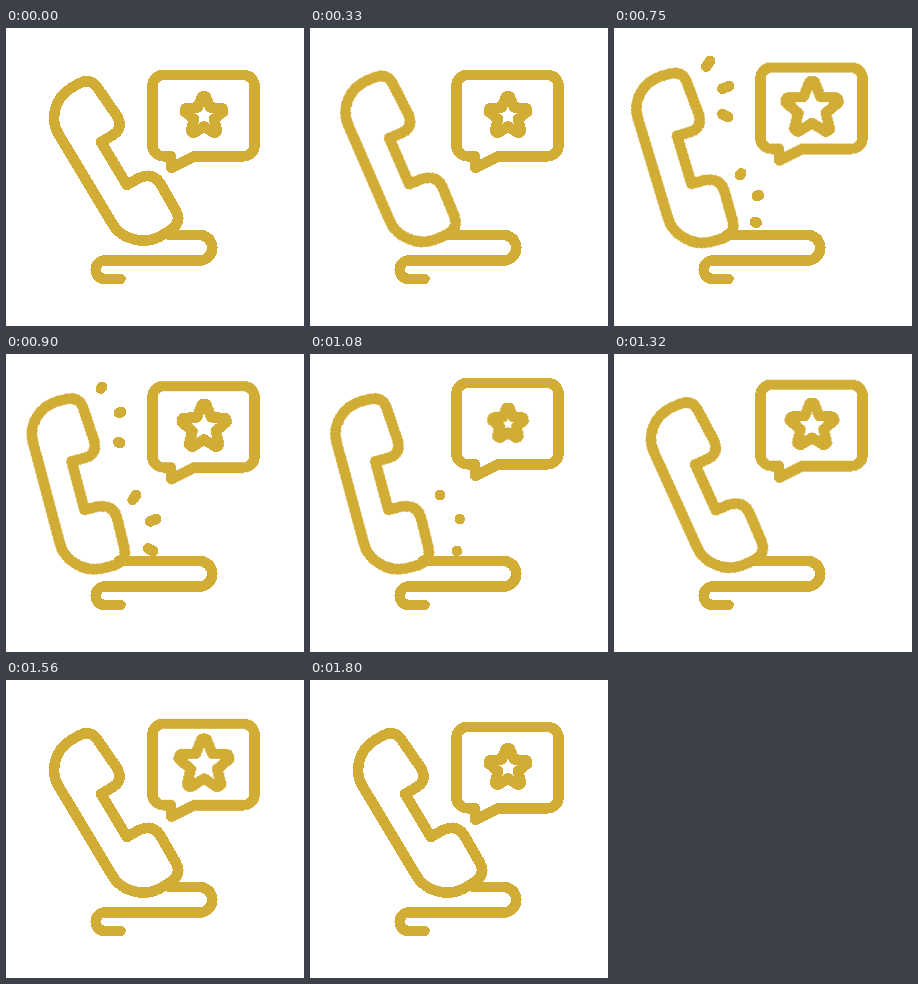
Recreate the animation shown at these times as an HTML page. Size 298 px wide and 298 px high, loop 2.25 s.

```html
<!DOCTYPE html>
<html lang="en">
<head>
<meta charset="utf-8">
<title>Ringing phone</title>
<style>
  html, body { margin: 0; height: 100%; overflow: hidden; background: #fff; }
  svg {
    display: block; width: 100%; height: 100%;
    fill: none; stroke: #d1ad35; stroke-width: 10.6;
    stroke-linecap: round; stroke-linejoin: round;
    shape-rendering: crispEdges;
  }
  .roll, .cord, .shake, .bubble, .star, .marks path {
    animation: 2250ms cubic-bezier(.37, 0, .63, 1) infinite;
  }
  .roll, .shake { transform-origin: 129px 185px; }
  .roll { animation-name: roll; }
  .shake { animation-name: shake; }
  .cord { stroke-dasharray: 400; animation-name: cord; }
  .bubble { animation-name: lift; }
  .star { animation-name: pulse; }
  #arm { vector-effect: non-scaling-stroke; }
  .marks path { stroke-width: 0; animation-name: ring; animation-timing-function: linear; }
  .marks .late { animation-delay: 120ms; }

  /* The handset rolls left along the cord and back. */
  @keyframes roll {
    0%, 6.67%, 64.89%, 100% { transform: translateX(0) rotate(0deg); }
    22.67%, 51.56% { transform: translateX(-50.5px) rotate(15deg); }
  }
  @keyframes cord {
    0%, 6.67%, 64.89%, 100% { stroke-dashoffset: -51; }
    22.67%, 51.56% { stroke-dashoffset: 0; }
  }
  @keyframes shake {
    0%, 22.67%, 51.56%, 100% { transform: rotate(0deg); }
    25.07%, 34.7%, 44.3% { transform: rotate(-1.2deg); }
    29.87%, 39.5%, 49.15% { transform: rotate(1.2deg); }
  }
  @keyframes lift {
    0%, 22.67% { transform: translateY(0); }
    46.67%, 54.67% { transform: translateY(-18px); }
    75.1%, 100% { transform: translateY(0); }
  }
  @keyframes pulse {
    0%, 21.33%, 80%, 100% { transform: scale(1); }
    34.2% { transform: scale(1.38); }
    48% { transform: scale(.82); }
    66.67% { transform: scale(1.35); }
  }
  /* Each dash grows outward, then draws in to a dot at its far end. */
  @keyframes ring {
    0%, 24.9% { stroke-width: 0; stroke-dasharray: .01 3; stroke-dashoffset: 0; }
    26.2% { stroke-width: 10.6; stroke-dasharray: .01 3; stroke-dashoffset: 0; }
    32.9% { stroke-width: 10.6; stroke-dasharray: 1 3; stroke-dashoffset: 0; }
    42.7% { stroke-width: 10.6; stroke-dasharray: .02 3; stroke-dashoffset: -.97; }
    44.9%, 100% { stroke-width: 0; stroke-dasharray: .02 3; stroke-dashoffset: -.97; }
  }
</style>
</head>
<body>
<svg viewBox="0 0 298 298">
  <defs>
    <path id="arm" d="M-6.2-8.5L-1.8-19.5Q0-20.3 1.8-19.5L6.2-8.5"/>
  </defs>

  <path class="cord" d="M113 207H193.5a12.75 12.75 0 0 1 0 25.5H99a9.25 9.25 0 0 0 0 18.5H114.5"/>

  <g class="roll">
    <path class="shake" d="M53 107C43 91 49 70 65 60L74 55Q84 50 91 59L111 88Q118 100 107 107L95 114L121 157L133 150Q147 144 154 155L170 183Q176 194 165 202L153 209C136 217 115 211 106 195Z"/>
  </g>

  <g class="marks">
    <path pathLength="1" d="M92 39L96 33"/>
    <path pathLength="1" d="M108 61L115 58"/>
    <path pathLength="1" d="M108 86L114 89"/>
    <path class="late" pathLength="1" d="M126 147L130 141"/>
    <path class="late" pathLength="1" d="M143 168L150 165"/>
    <path class="late" pathLength="1" d="M141 194L147 197"/>
  </g>

  <g class="bubble">
    <path d="M165 128.3H157.5a11 11 0 0 1-11-11V58a11 11 0 0 1 11-11H237.5a11 11 0 0 1 11 11V117.3a11 11 0 0 1-11 11H188L165.5 140Z"/>
    <g transform="translate(198 88)">
      <g class="star">
        <use href="#arm"/>
        <use href="#arm" transform="rotate(72)"/>
        <use href="#arm" transform="rotate(144)"/>
        <use href="#arm" transform="rotate(216)"/>
        <use href="#arm" transform="rotate(288)"/>
      </g>
    </g>
  </g>
</svg>
</body>
</html>
```
